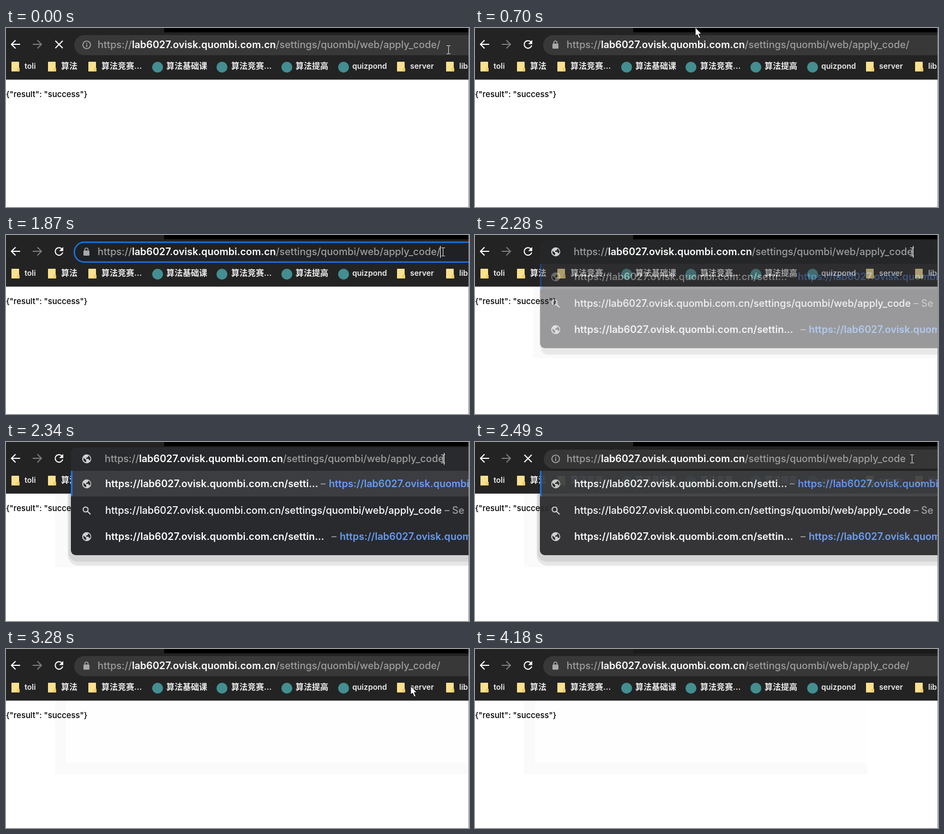
Animation, 849 px wide and 329 px high, one loop 4.28 s. Source, as an HTML page with a canvas:

```html
<!DOCTYPE html>
<html lang="en">
<head>
<meta charset="utf-8">
<style>
html, body { margin: 0; width: 100%; height: 100%; overflow: hidden; background: #fff; }
canvas { display: block; }
</style>
</head>
<body>
<canvas id="stage" width="849" height="329"></canvas>
<script>
const W = 849, H = 329, LOOP = 4280;
const ctx = document.getElementById('stage').getContext('2d');

const SANS = 'Inter, "Noto Sans CJK SC", "Noto Sans CJK", sans-serif';
const TOOLBAR = '#232323', PANEL = '#292a2d', GRAY = '#9e9e9e', LIGHT = '#d0d0d0', BLUE = '#1a73e8';
const SCHEME = 'https://', HOST = 'lab6027.ovisk.quombi.com.cn', PATH = '/settings/quombi/web/apply_code';
const URL_FONT = '500 18.1px ' + SANS, BOLD_FONT = '600 18.1px ' + SANS;

const BOOKMARKS = [
  [10, 34, 'toli', 'folder'], [77, 101, '算法', 'folder'], [151, 175, '算法竞赛...', 'folder'],
  [278, 294, '算法基础课', 'site'], [396, 413, '算法竞赛...', 'site'], [515, 531, '算法提高', 'site'],
  [619, 635, 'quizpond', 'site'], [717, 741, 'server', 'folder'], [807, 831, 'lib', 'folder']
];

// Pointer path: time, x, y
const POINTER = [
  [0, 811, 40], [470, 811, 40], [820, 192, -22], [970, 192, -22], [1360, 801, 31],
  [3040, 801, 31], [3280, 742, 68], [3400, 722, 135], [3580, 834, 255], [3810, 843, 331], [LOOP, 843, 331]
];

function rect(c, x, y, w, h, color) {
  c.fillStyle = color;
  c.fillRect(x, y, w, h);
}

function roundRect(c, x, y, w, h, r, color) {
  c.beginPath();
  c.roundRect(x, y, w, h, r);
  c.fillStyle = color;
  c.fill();
}

function disc(c, x, y, r, color) {
  c.beginPath();
  c.arc(x, y, r, 0, Math.PI * 2);
  c.fillStyle = color;
  c.fill();
}

// Draws a string and returns the x where it ends.
function text(c, str, x, y, font, color) {
  c.font = font;
  c.fillStyle = color;
  c.fillText(str, x, y);
  return x + c.measureText(str).width;
}

function stroke(c, color, width, d) {
  c.strokeStyle = color;
  c.lineWidth = width;
  c.stroke(new Path2D(d));
}

function globe(c, x, y) {
  disc(c, x, y, 8.3, LIGHT);
  c.fillStyle = PANEL;
  c.fill(new Path2D(`M${x - 6} ${y - 2}l5 4v4l-3-1q-3-3-2-7zM${x - 1} ${y - 6}h4l-1 3-3 1v2h4l2 3 2-2q0-5-4-7z`));
}

function magnifier(c, x, y) {
  stroke(c, LIGHT, 2, `M${x + 2.5} ${y - 2}a4.5 4.5 0 1 0-9 0a4.5 4.5 0 1 0 9 0M${x + 1.5} ${y + 1.5}l5.5 5.5`);
}

function folder(x) {
  roundRect(ctx, x, 62, 14, 18, 1, '#fbe18f');
  roundRect(ctx, x + 10, 73, 5, 7, 1, '#f2cd68');
  rect(ctx, x, 79, 14, 1, '#edc65c');
}

function buildPanel() {
  const canvas = document.createElement('canvas');
  canvas.width = W;
  canvas.height = H;
  const c = canvas.getContext('2d');
  roundRect(c, 119, 53, 760, 155, [0, 0, 0, 9], PANEL);
  rect(c, 119, 53, 730, 47, '#3c3d40');
  rect(c, 119, 53, 3, 47, BLUE);

  const page = SCHEME + HOST;
  const match = (y, tail, dashX, linkX) => {
    globe(c, 148, y);
    text(c, page + tail, 182, y + 6, BOLD_FONT, '#fff');
    text(c, '–', dashX, y + 6, URL_FONT, GRAY);
    text(c, page, linkX, y + 6, BOLD_FONT, '#669df6');
  };
  match(77, '/setti...', 577, 592);
  match(174, '/settin...', 597, 612);
  magnifier(c, 148, 126);
  const end = text(c, page + PATH, 182, 132, URL_FONT, '#fff');
  text(c, '– Se', end + 5, 132, URL_FONT, GRAY);
  return canvas;
}

function drawNav(loading) {
  stroke(ctx, '#fff', 2, 'M26 30H10M17.5 22.5L10 30l7.5 7.5');
  stroke(ctx, '#7b7b7b', 2, 'M49 30h16M57.5 22.5L65 30l-7.5 7.5');
  if (loading) {
    stroke(ctx, '#fff', 2, 'M90.5 23.5l13.5 13.5M104 23.5L90.5 37');
  } else {
    stroke(ctx, '#fff', 2, 'M102.5 25.5A7 7 0 1 0 104 32');
    ctx.fillStyle = '#fff';
    ctx.fill(new Path2D('M105 22v7.5h-7.5z'));
  }
}

function drawBookmarks() {
  for (const [x, labelX, label, kind] of BOOKMARKS) {
    if (kind === 'folder') folder(x);
    else disc(ctx, x, 72, 10, '#438e91');
    text(ctx, label, labelX, 75, `600 ${/[a-z]/.test(label) ? 14 : 15}px ${SANS}`, '#ececec');
  }
}

function drawSiteIcon(secure) {
  if (secure) {
    roundRect(ctx, 142, 28.5, 11, 9.5, 1.5, '#a8a8a8');
    stroke(ctx, '#a8a8a8', 1.6, 'M144.5 29v-2a3 3 0 0 1 6 0v2');
  } else {
    stroke(ctx, '#a8a8a8', 1.7, 'M155 31a7 7 0 1 0-14 0a7 7 0 1 0 14 0M148 30v5M148 27v1.8');
  }
}

function drawUrl(x, slash, selected) {
  const dim = selected ? '#f1f1f1' : GRAY;
  if (selected) {
    ctx.font = URL_FONT;
    let width = ctx.measureText(SCHEME + PATH + '/').width;
    ctx.font = BOLD_FONT;
    width += ctx.measureText(HOST).width;
    rect(ctx, x, 18, width, 25, '#185abc');
  }
  x = text(ctx, SCHEME, x, 37, URL_FONT, dim);
  x = text(ctx, HOST, x, 37, BOLD_FONT, '#fff');
  return text(ctx, PATH + (slash ? '/' : ''), x, 37, URL_FONT, dim);
}

function drawPill(t) {
  const focused = t >= 1480 && t < 2280;
  if (focused) {
    roundRect(ctx, 124, 12, 760, 39, 19.5, BLUE);
    roundRect(ctx, 126.5, 14.5, 755, 34, 17, '#202124');
  } else if (t >= 2490 && t < 3070) {
    roundRect(ctx, 126, 14, 760, 35, 17.5, '#363636');
  } else {
    const hover = t >= 1180 && t < 1480;
    roundRect(ctx, 125, 13, 760, 37, 18.5, hover ? '#3d3d3d' : '#383838');
  }
  drawSiteIcon(!(t < 60 || (t >= 2490 && t < 2550)));
  const end = drawUrl(168, t < 2280 || t >= 2520, t >= 1510 && t < 1870);
  if (t >= 1870 && t < 2280) rect(ctx, Math.round(end), 20, 1, 22, '#fff');
}

function panelAlpha(t) {
  if (t < 2280 || t >= 2550) return 0;
  if (t < 2310) return 0.41;
  if (t < 2340) return 0.8;
  if (t < 2490) return 1;
  return t < 2520 ? 0.93 : 0.45;
}

function drawShadow(t) {
  if (t < 2280) return;
  if (t < 2550) {
    const opening = t < 2310;
    const left = opening ? 107 : 90, bottom = opening ? 226 : 230;
    rect(ctx, left, 95, W - left, bottom - 95, '#fafafa');
    if (opening) {
      roundRect(ctx, 121, 80, 760, 140, 12, '#e9e9e9');
    } else {
      roundRect(ctx, 113, 80, 780, 147, 20, '#e6e6e6');
      roundRect(ctx, 115, 80, 780, 140, 16, '#d4d4d4');
    }
    return;
  }
  // Faint trace left behind by the closed panel
  const right = t < 3400 ? 848 : 719;
  rect(ctx, 90, 95, right - 90, 135, '#fafafa');
  rect(ctx, 110, 95, right - 110, 115, '#fefefe');
}

function pointerAt(t) {
  const time = Math.max(0, Math.floor((t - 10) / 30) * 30 + 10);
  const i = Math.max(1, POINTER.findIndex(p => p[0] >= time));
  const [t0, x0, y0] = POINTER[i - 1], [t1, x1, y1] = POINTER[i];
  const k = (time - t0) / (t1 - t0);
  return [Math.round(x0 + (x1 - x0) * k), Math.round(y0 + (y1 - y0) * k)];
}

function drawPointer(t) {
  const [x, y] = pointerAt(t);
  if (y >= 13 && y < 50) {
    stroke(ctx, '#e4e4e4', 1, `M${x - 3} ${y - 7.5}h3l.5 1 .5-1h3M${x + 0.5} ${y - 7}v14M${x - 3} ${y + 7.5}h3l.5-1 .5 1h3`);
    return;
  }
  const arrow = new Path2D(`M${x} ${y}v16l3.5-3 3 7 3-1.4-3-6.6h5z`);
  ctx.fillStyle = '#fff';
  ctx.fill(arrow);
  ctx.strokeStyle = '#000';
  ctx.lineWidth = 1;
  ctx.stroke(arrow);
}

function draw(t, panel) {
  rect(ctx, 0, 0, W, H, '#fff');
  drawShadow(t);
  text(ctx, '{"result": "success"}', 0, 127, '500 14.8px ' + SANS, '#000');
  rect(ctx, 0, 0, W, 95, TOOLBAR);
  rect(ctx, 0, 94, W, 1, '#3f3f3f');
  rect(ctx, 290, 0, W - 290, 8, t >= 4180 ? '#1a1a1a' : '#000');
  drawNav(t < 250 || (t >= 2490 && t < 2700));
  drawBookmarks();

  const alpha = panelAlpha(t), open = t >= 2280 && t < 2490;
  ctx.globalAlpha = alpha;
  if (open) roundRect(ctx, 119, 10, 760, 43, [9, 0, 0, 0], PANEL);
  if (alpha) ctx.drawImage(panel, 0, 0);
  ctx.globalAlpha = 1;

  if (open) {
    globe(ctx, 148, 31);
    rect(ctx, Math.round(drawUrl(181, false, false)), 20, 1, 22, '#fff');
  } else {
    drawPill(t);
  }
  drawPointer(t);
  rect(ctx, 848, 0, 1, H, '#909090');
}

const panel = buildPanel();
const start = performance.now();

function tick() {
  draw((performance.now() - start) % LOOP, panel);
  requestAnimationFrame(tick);
}
tick();
</script>
</body>
</html>
```
